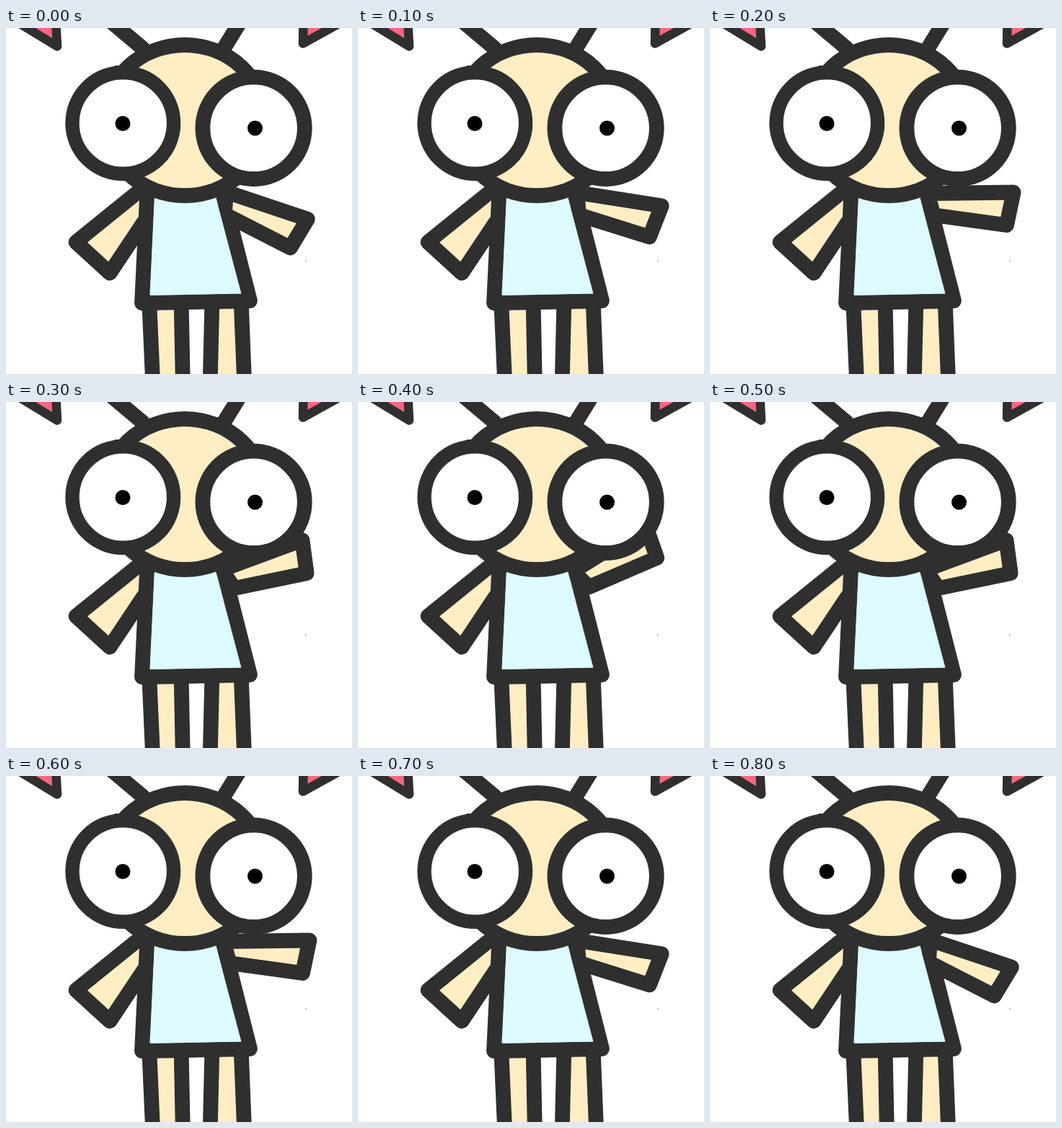
These frames come from a looping animation (480x480 px, 900 ms). An HTML page:

```html
<!DOCTYPE html>
<html lang="en">
<head>
<meta charset="utf-8">
<title>Waving bug</title>
<style>
  html, body { margin: 0; width: 100%; height: 100%; overflow: hidden; background: #fff; }
  svg { display: block; width: 100%; height: 100%; }
  .ink { stroke: #2f2f2f; stroke-width: 20.8; stroke-linejoin: round; stroke-linecap: round; }
  .skin { fill: #ffeec4; }
  .shirt { fill: #ddfaff; }
  .ear { fill: #fa667f; stroke-width: 12.5; }
  .eye { fill: #fff; }
</style>
</head>
<body>
<svg viewBox="0 0 480 480">
  <path class="ink ear" d="M-20-30L71 25.500L68-30zM505-30L412 21.500L413-30z"/>
  <path class="ink" d="M137-16L190 28.500M335-25L303 27"/>

  <!-- legs -->
  <path class="ink skin" d="M198.500 375L204 500H245.500L243 375zM286 375L283 500H331L326 375z"/>

  <!-- body and arms -->
  <path class="ink skin" d="M196 217L97 297L144 340L191 269.500"/>
  <path class="ink shirt" d="M196 225L188.500 381.500L338.500 378.500L299.500 225z"/>
  <path id="arm" class="ink skin" d="M302 229.500L421 228L411.500 273.500L310 259.500z"/>
  <path class="shirt" d="M206.500 225H288.500L326.500 368.500L200 371z"/>

  <!-- head -->
  <circle cx="153" cy="57" r="5" fill="#2f2f2f"/>
  <ellipse class="ink skin" cx="248" cy="128" rx="111.500" ry="104.500"/>
  <circle class="ink eye" cx="162.300" cy="132" r="70.300" style="stroke-width:19.4"/>
  <circle class="ink eye" cx="343.600" cy="138.800" r="70.700"/>
  <circle cx="162" cy="132.500" r="10.500"/>
  <circle cx="345.500" cy="139" r="10.500"/>

  <circle cx="416" cy="323" r=".8" fill="#777"/>
</svg>
<script>
  const STEP_MS = 100;
  const armAngles = [19.2, 9.6, 0, -19.5, -31, -19.5, 0, 9.6, 19.2];
  const arm = document.getElementById("arm");

  function draw() {
    const step = Math.floor(performance.now() / STEP_MS) % armAngles.length;
    arm.setAttribute("transform", `rotate(${armAngles[step]} 310 239)`);
    requestAnimationFrame(draw);
  }
  draw();
</script>
</body>
</html>
```
